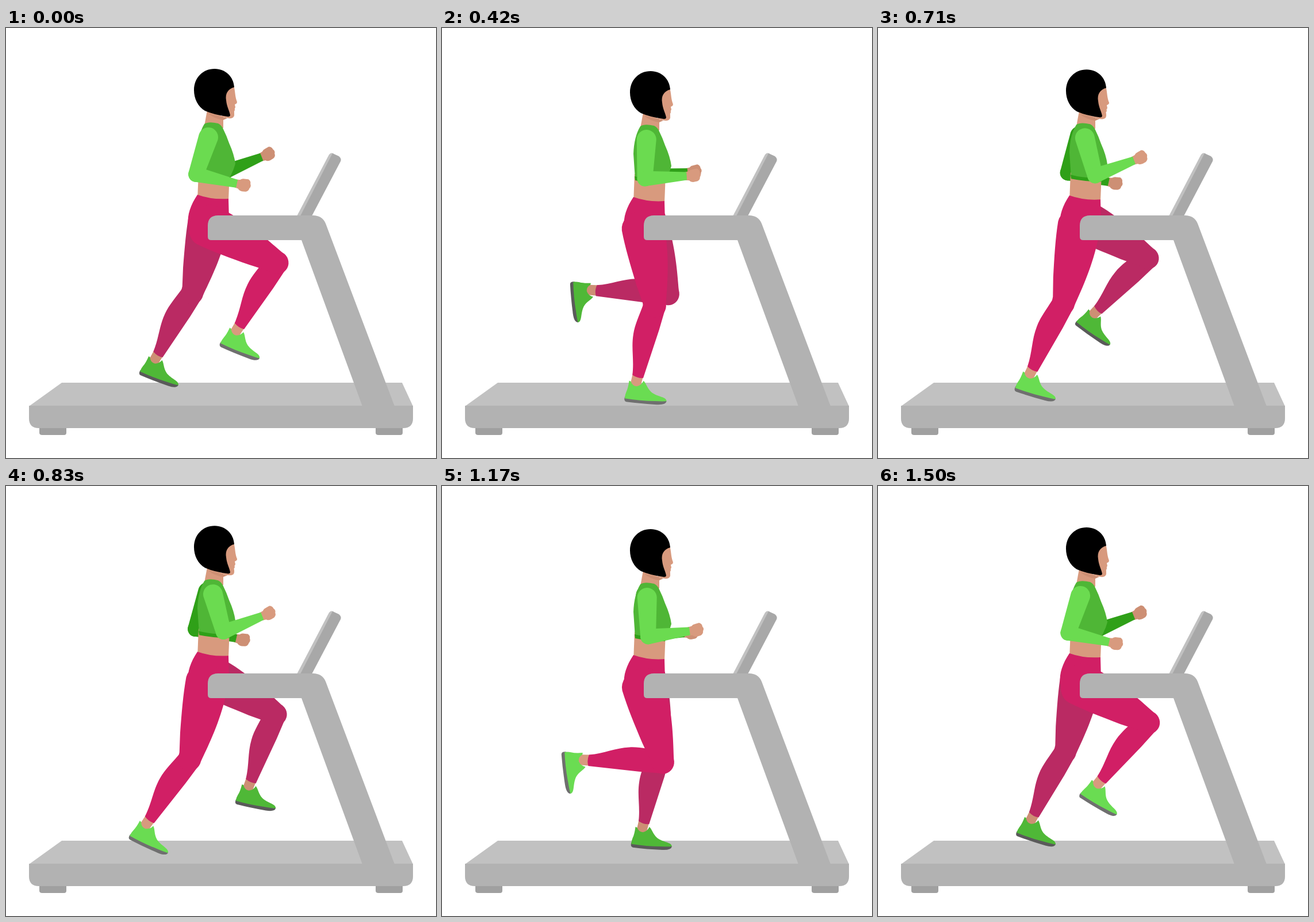
An HTML page for the animation above (1540 ms loop, 748 by 748 pixels).

```html
<!DOCTYPE html>
<html lang="en">
<head>
<meta charset="utf-8">
<title>Treadmill run</title>
<style>
html, body { margin: 0; width: 100%; height: 100%; overflow: hidden; background: #fff; }
svg { display: block; width: 100vw; height: 100vh; }
</style>
</head>
<body>
<svg viewBox="0 0 748 748">
  <g id="deck">
    <path fill="#a0a0a0" d="M58 694H105V704Q105 708 101 708H63Q58 708 58 704ZM643 694H690V704Q690 708 686 708H648Q643 708 643 704Z"/>
    <path fill="#c1c1c1" d="M97 617H689L708 658H40Z"/>
    <path fill="#b2b2b2" d="M40 657H708V679Q708 696 691 696H57Q40 696 40 679Z"/>
  </g>

  <g id="body">
    <g id="farArm"></g>
    <g id="farLeg"></g>
    <path fill="#d89a7e" d="M335 250L333 300H387L389 250Z"/>
    <path fill="#d11f65" d="M333 290Q358 299 387 297L388 335Q376 362 350 372Q322 364 317 342C315 325 321 308 333 290Z"/>
    <g id="nearLeg"></g>

    <path fill="#d89a7e" d="M350 143L345 170Q362 180 378 174V154Z"/>
    <path fill="#cd8f74" d="M351 148L385 157L378 160Q362 158 351 148Z"/>
    <path fill="#d89a7e" d="M396 100C399 110 398 117 401 126Q404 131 398 133L399 138Q397 140 398 143Q396 145 397 148Q398 156 392 157Q384 158 376 154L378 105Z"/>
    <path fill="#000" d="M397 103C386 106 381 114 383 126C384 137 389 145 390 152Q389 155 385 154Q362 151 346 144C334 137 327 123 327 108C327 87 342 71 363 71C382 71 396 85 397 103Z"/>

    <path fill="#4fb636" d="M345 167Q352 162 369 166Q375 169 378 176Q384 188 388 200Q397 220 399 236Q396 248 388 262V266Q360 264 336 259L333 215Q334 185 345 167Z"/>
    <path fill="#2fa018" d="M335 254Q360 261 391 259L388 266Q360 266 336 261Z"/>
    <g id="nearArm"></g>
  </g>

  <g id="frame">
    <path fill="#c1c1c1" d="M506 327L561 222Q564 216 569 218L574 224L520 327Z"/>
    <path fill="#a8a8a8" d="M512 327L568 218L579 223Q584 227 582 232L532 327Z"/>
    <path fill="#b2b2b2" d="M369 326H534Q550 326 556 340L676 658H620L514 369H357Q351 369 351 363V344Q351 326 369 326Z"/>
  </g>
</svg>
<script>
const FRAMES = 37, FPS = 24, LOOP = 1540;
const UPPER_ARM = 68, THIGH = 136, ANKLE = 139, FOOT_TILT = -10;
const { sin, cos, PI } = Math;

const el = id => document.getElementById(id);
const place = (x, y, a) => `translate(${x.toFixed(2)} ${y.toFixed(2)}) rotate(${a.toFixed(2)})`;
const along = (len, deg) => [len * sin(deg * PI / 180), len * cos(deg * PI / 180)];

// One stride is a turn of w. Limb angles are degrees from straight down, forward positive.
const bob = w => 0.9 - 2 * cos(2 * w) - 2.2 * sin(2 * w) + 1.1 * cos(4 * w) - 0.6 * sin(4 * w);
const thighTurn = w => 18 + 36 * cos(w) + 6 * cos(2 * w + 0.1) + 1.5 * cos(3 * w - 0.3);
const shinTurn = w => -39.2 - 3.2 * cos(w) + 36.9 * sin(w) + 10.9 * cos(2 * w) + 7.8 * sin(2 * w)
  + 2.5 * cos(3 * w) - 1.9 * sin(3 * w) - 1.2 * cos(4 * w);
const armSwing = w => 1.1 * cos(w - 0.17) - 0.1 * cos(3 * (w - 0.17));

function makeLeg(root, c) {
  root.innerHTML = `
    <g class="shin">
      <path fill="${c.skin}" d="M-9 122H10L9 144Q0 150 -9 144Z"/>
      <path fill="${c.pants}" d="M-18 0C-20 20 -25 40 -23.5 57C-22 82 -12 100 -9 127Q1 131 10.5 128L18.5 40L20.5 5A20 20 0 0 0 -18 0Z"/>
      <g transform="${place(0, ANKLE, FOOT_TILT)}">
        <path fill="${c.sole}" d="M-18 25Q-20 33 -15 34Q10 36 38 36Q54 36 55 29L40 24Z"/>
        <path fill="${c.shoe}" d="M-12 -3Q-13 10 -16 17Q-18 22 -18 28Q10 31 35 30Q49 30 55 29C54 21 40 23 28 15C20 9 18 0 13 -4Q10 4 2 6Q-6 6 -9 -2Z"/>
      </g>
    </g>
    <path class="thigh" fill="${c.pants}" d="M-37.5 0C-36 30 -31 62 -25.5 97L-19 130V137A20 21 0 0 0 21 137C26 112 36 72 37 22V0A37.2 30 0 0 0 -37.5 0Z"/>`;
  const thigh = root.querySelector(".thigh"), shin = root.querySelector(".shin");
  return w => {
    const a = thighTurn(w);
    thigh.setAttribute("transform", place(0, 0, -a));
    shin.setAttribute("transform", place(...along(THIGH, a), -shinTurn(w)));
  };
}

function makeArm(root, c) {
  root.innerHTML = `
    <path class="upper" fill="${c.sleeve}" d="M-17 0A17 17 0 0 1 17 0L13.5 68A13.3 13.3 0 0 1 -13.3 68Z"/>
    <g class="fore">
      <path fill="${c.skin}" d="M70 -7L77 -8Q80 -11 84 -11L91 -12Q96 -10 96 -5Q99 -1 96 3Q96 8 91 10L85 11Q79 11 77 8L70 7Z"/>
      <path fill="${c.sleeve}" d="M0 -13.3L73 -7V7L0 13.3A13.3 13.3 0 0 1 0 -13.3Z"/>
    </g>`;
  const upper = root.querySelector(".upper"), fore = root.querySelector(".fore");
  return w => {
    const s = armSwing(w), a = -1.5 - 17 * s, x = -4 * s;
    const [ex, ey] = along(UPPER_ARM, a);
    upper.setAttribute("transform", place(x, 0, -a));
    fore.setAttribute("transform", place(x + ex, ey, -4.5 + 17.5 * s));
  };
}

const near = { skin: "#d89a7e", pants: "#d11f65", shoe: "#6adc52", sole: "#6f6f6f", sleeve: "#6bdb50" };
const far = { skin: "#cd8f74", pants: "#ba2a63", shoe: "#4fb837", sole: "#5a5a5a", sleeve: "#2fa018" };

const nearLimbs = [makeLeg(el("nearLeg"), near), makeArm(el("nearArm"), near)];
const farLimbs = [makeLeg(el("farLeg"), far), makeArm(el("farArm"), far)];
el("nearLeg").setAttribute("transform", "translate(350 343)");
el("farLeg").setAttribute("transform", "translate(354 331) scale(.97)");
el("nearArm").setAttribute("transform", "translate(356 190)");
el("farArm").setAttribute("transform", "translate(355 186)");

function pose(k) {
  const w = 2 * PI * k / FRAMES;
  el("body").setAttribute("transform", `translate(0 ${bob(w).toFixed(2)})`);
  nearLimbs.forEach(move => move(w));
  farLimbs.forEach(move => move(w + PI));
}

// Frame starts are rounded to 10 ms
function frameAt(t) {
  const k = Math.floor(t * FPS / 1000 + 0.5);
  return Math.round(k * 100 / FPS) * 10 > t ? k - 1 : k;
}

const start = performance.now();
function tick() {
  pose(frameAt((performance.now() - start) % LOOP));
  requestAnimationFrame(tick);
}
tick();
</script>
</body>
</html>
```
